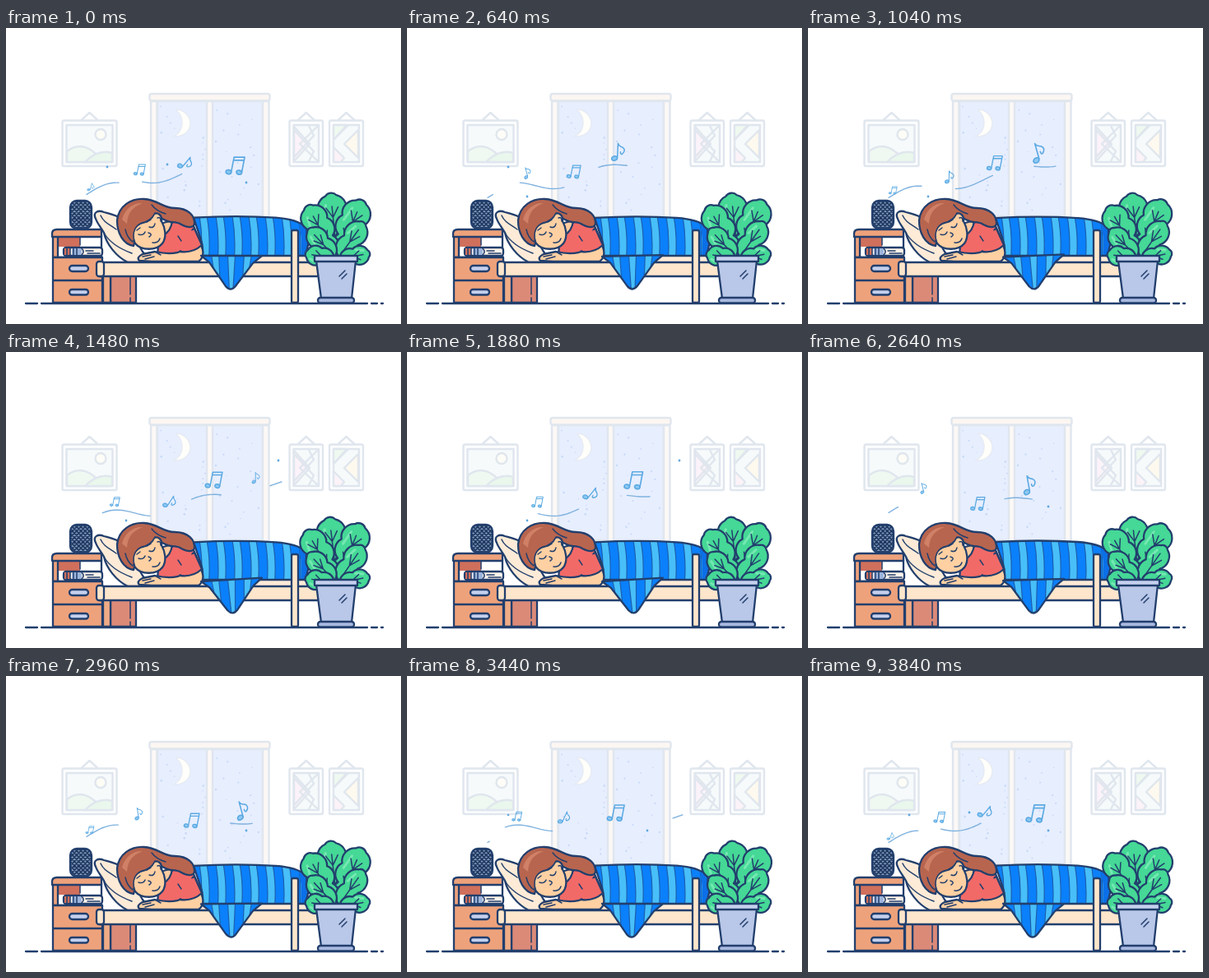
An HTML page for the animation above (3.88 s loop, 480 px wide and 360 px high).

```html
<!DOCTYPE html>
<html lang="en">
<head>
<meta charset="utf-8">
<title>Sleeping to music</title>
<style>
  html, body { margin: 0; width: 100%; height: 100%; overflow: hidden; background: #fff; }
  svg { display: block; width: 480px; height: 360px; }
  .ink { stroke: #223f6d; stroke-width: 2.3; stroke-linecap: round; stroke-linejoin: round; }
  .thin { stroke: #223f6d; stroke-width: 1.5; stroke-linecap: round; fill: none; }
  .pale { stroke: #e0e6ee; stroke-width: 2.4; stroke-linejoin: round; }
  .none { fill: none; }
  .trail { fill: none; stroke: #7fb2df; stroke-width: 1.4; stroke-linecap: round; }
  .note { fill: none; stroke: #5aa9e2; stroke-width: 1.3; stroke-linecap: round; stroke-linejoin: round; }
  .note ellipse { fill: #8cc8f2; }
  .dot { fill: #5fa8e0; }
</style>
</head>
<body>
<svg viewBox="0 0 480 360">
  <defs>
    <clipPath id="coverClip"><path id="coverShape" d="M228 231Q280 228 328 231Q354 233 364 242Q369 250 368 260L364 277H237Q241 270 237 258Z"/></clipPath>
    <clipPath id="flapClip"><path id="flapShape" d="M237 277L247 285L267 314Q273 321 279 314L300 286L311 277Z"/></clipPath>
    <clipPath id="speakerClip"><rect x="78" y="210" width="26" height="34" rx="8"/></clipPath>
  </defs>

  <g class="pale">
    <path fill="#e7eefe" d="M184 89H312V229H184Z"/>
    <g id="snow" stroke="none" fill="#c6d9f8"></g>
    <path fill="#fffefa" stroke="#e6ebf4" stroke-width="1.500" d="M206 99C216 99 224 107 224 116C224 126 215 133 203 132C210 129 214 123 214 115C214 108 211 103 206 99Z"/>
    <path fill="#fbf8f6" d="M176 89H183.500V232H176ZM244 89H251V232H244ZM312 89H319.500V230H312Z"/>
    <rect fill="#fcf6f2" x="174.500" y="80" width="146" height="8.500" rx="2.500"/>
  </g>

  <g id="pictures" class="pale"></g>

  <path class="ink none" d="M24 335H38M43 335H439M444 335H451M456 335H458"/>

  <g class="ink">
    <path fill="#fff" d="M58 253H116V279H58Z"/>
    <path fill="#d0705c" stroke="none" d="M63 254H90V266H63Z"/>
    <path fill="#eea27b" d="M57 253H63V279H57Z"/>
    <path class="thin" d="M90 254V264"/>
    <rect x="70" y="267" width="47" height="10" rx="3" fill="#fdf3ea"/>
    <path fill="#d0705c" stroke="none" d="M71 268H78V276H71Z"/>
    <path fill="#9db5dc" stroke="none" d="M80 268H92V276H80Z"/>
    <path class="thin" d="M74 267V277M78 267V277M82 267V277M86 267V277M92 268Q96 272 92 276M97 271H106M99 274H114"/>
    <path fill="#eea27b" d="M57 279H117V307H57ZM57 307H117V334H57Z"/>
    <rect x="77" y="289" width="23" height="7" rx="3.500" fill="#c4d0ee"/>
    <rect x="77" y="318" width="23" height="6.500" rx="3.200" fill="#c4d0ee"/>
    <path fill="#eea27b" d="M56 254V250Q56 245 62 245H116V254Z"/>
  </g>

  <rect x="78" y="210" width="26" height="34" rx="8" fill="#7e9abd"/>
  <path id="mesh" clip-path="url(#speakerClip)" fill="none" stroke="#223a61" stroke-width="1.800"/>
  <rect class="ink none" x="78" y="210" width="26" height="34" rx="8"/>

  <g class="ink">
    <path fill="#dc8a78" d="M127 300H158V334H127Z"/>
    <path fill="#efab85" d="M118 300H127V334H118Z"/>
    <path class="thin" d="M151 303V324M151 328V334"/>
    <path fill="#fdebd8" d="M182 276H364V287H182Z" stroke="none"/>
    <path fill="#fdebd8" d="M109 232C105 224 112 221 119 224C130 227 140 229 147 239L166 272L176 285H148C134 278 122 263 119 249C116 243 111 238 109 232Z"/>
    <path class="thin" d="M115 228C119 237 126 239 134 245M119 249C124 258 134 267 153 274"/>
  </g>

  <g class="ink">
    <path fill="#f26a67" d="M186 248L207 233C216 232 224 235 228 241L238 266L213 278H184Z"/>
    <path fill="#fdcb9e" d="M184 239L202 234Q201 247 190 253Z"/>
    <path fill="#b8654f" d="M155 265C142 263 135 249 135 234C137 216 152 207 168 208C185 209 190 219 205 219C221 219 230 228 229 239C226 244 219 242 213 239C206 234 200 238 194 234L182 228L160 247Z"/>
    <path fill="#cf8066" stroke="none" d="M141 233C144 219 156 212 166 213C153 218 148 225 147 238Z"/>
    <path class="thin" d="M177 215Q183 223 194 226M145 245Q147 255 154 260"/>
    <path fill="#ffd0a2" d="M157 262C151 252 155 242 163 238C172 236 178 231 180 226C185 224 190 228 189 235C193 242 196 254 190 262C183 271 164 271 157 262Z"/>
    <path fill="#b8654f" stroke="none" d="M156 259C153 249 157 240 165 237C174 235 178 231 181 225L172 218L153 233L149 253Z"/>
    <path class="thin" d="M156 259C153 249 157 240 165 237C174 235 178 231 181 225"/>
    <path class="thin" d="M184 231Q188 229 188 235M161 251Q167 253 169 248M174 242Q180 244 181 238M159 246L163 243M171 236L176 233M173 249Q179 251 174 254M178 261Q185 262 187 256"/>
  </g>

  <g id="cover">
    <g clip-path="url(#coverClip)">
      <path fill="#48bff9" d="M225 225H372V280H225Z"/>
      <path id="coverStripes"/>
      <path fill="#0b70e8" d="M354 232Q361 252 358 278H372V236Z"/>
    </g>
    <use href="#coverShape" class="ink none"/>
  </g>

  <g class="ink">
    <path fill="#ffd0a2" d="M223 258L237 264Q243 277 234 284H177L162 283Q158 279 166 275L181 272Q204 277 216 270Z"/>
    <path fill="#f26a67" d="M210 252L229 244L238 264Q227 274 212 272Z"/>
    <path fill="#f26a67" stroke="none" d="M209 250L226 243L223 258L214 270L205 271Z"/>
    <path class="thin" d="M166 278L176 276M169 281L180 278M181 272L188 276M209 253L213 259"/>
    <rect x="112" y="285" width="268" height="17" rx="2" fill="#fde6cb"/>
    <rect x="110" y="284" width="9" height="18" rx="3" fill="#fde6cb"/>
  </g>

  <g id="flap">
    <g clip-path="url(#flapClip)">
      <path fill="#48bff9" d="M230 275H320V322H230Z"/>
      <path id="flapStripes"/>
    </g>
    <use href="#flapShape" class="ink none"/>
  </g>
  <rect class="ink" x="347" y="246" width="8" height="88" rx="2" fill="#fde6cb"/>

  <g id="plant" class="ink"></g>
  <g class="ink">
    <path fill="#b9c7e8" d="M377 283H425L420 329H383Z"/>
    <path fill="#c5d1ee" d="M375 277H427V284H375Z"/>
    <rect x="379" y="328" width="44" height="6.500" rx="3" fill="#aab9df"/>
    <path class="thin" d="M405 302L412 295M408 305L414 299"/>
  </g>

  <g id="music"></g>
</svg>

<script>
const LOOP = 3880;
const { sin, cos, min, max, hypot, PI } = Math;
const $ = id => document.getElementById(id);
const range = (n, f) => Array.from({ length: n }, (_, i) => f(i));
const clamp = v => max(0, min(1, v));
const mod = (a, b) => ((a % b) + b) % b;

function add(parent, tag, attrs, html = '') {
  const node = document.createElementNS('http://www.w3.org/2000/svg', tag);
  for (const k in attrs) node.setAttribute(k, attrs[k]);
  node.innerHTML = html;
  parent.appendChild(node);
  return node;
}

// ---------- still scenery ----------
let seed = 11;
const rnd = () => (seed = (seed * 16807) % 2147483647) / 2147483647;
range(40, i => add($('snow'), 'circle', {
  cx: (i % 2 ? 254 : 188) + rnd() * 54, cy: 94 + (i + rnd()) * 3.2, r: 0.7 + rnd() * 0.6
}));

function frame(x, w, art) {
  const c = x + w / 2;
  add($('pictures'), 'g', {}, `
    <path fill="none" d="M${c - 10} 112L${c} 103L${c + 10} 112"/>
    <rect x="${x}" y="112.5" width="${w}" height="55.5" rx="2" fill="#fcfdfe"/>
    <rect x="${x + 5}" y="118" width="${w - 10}" height="45" fill="#f6fafb"/>${art}`);
}
frame(68.5, 66, `<circle cx="115" cy="129.5" r="6.5" fill="#fdfcf6"/>
  <path fill="#f0f9f1" d="M74 150Q91 137 108 152L124 163H74Z"/>
  <path fill="#e9f7ec" d="M96 163Q112 147 129 152V163Z"/>`);
frame(344.5, 40.5, `<path fill="#fbf3f9" d="M350 120L369 141L350 162Z"/>
  <path fill="none" d="M379 119L357 141L379 162M350 124L374 150L368 162M350 157L374 131L368 119"/>`);
frame(393, 41, `<path fill="#f0f9f0" d="M398 118H414L398 136Z"/><path fill="#fbf3f8" d="M398 145L411 158L407 163H398Z"/>
  <path fill="#fdf9ee" d="M428 124L411 141L428 158Z"/><path fill="none" d="M398 136L416 118"/>`);

$('mesh').setAttribute('d', range(16, i =>
  `M${50 + i * 5.2} 208l38 38M${132 - i * 5.2} 208l-38 38`).join(''));

function stripes(id, d) {
  const edge = $(id), line = { d, fill: 'none' };
  const group = add(edge.parentNode, 'g', {});
  add(group, 'path', { ...line, stroke: '#1b5fae', 'stroke-width': 12 });
  add(group, 'path', { ...line, stroke: '#0b80fb', 'stroke-width': 9.6 });
  edge.replaceWith(group);
}
stripes('coverStripes', range(8, i => `M${229 + i * 20} 226q5 25 3 54`).join(''));
stripes('flapStripes', range(4, i => {
  const x = 244 + i * 20;
  return `M${x} 275L${273 + (x - 273) * 0.75} 322`;
}).join(''));

// Scalloped leaf from base to tip.
function leaf(bx, by, tx, ty, w, n) {
  const dx = tx - bx, dy = ty - by, len = hypot(dx, dy);
  const at = (u, s) => {
    const k = s * w * sin(PI * (0.05 + 0.8 * u ** 1.3)) / len;
    return [bx + dx * u - dy * k, by + dy * u + dx * k];
  };
  const lobes = pts => pts.slice(1).map((p, i) => {
    const r = hypot(p[0] - pts[i][0], p[1] - pts[i][1]) * 0.64;
    return `A${r} ${r} 0 0 1 ${p}`;
  }).join('');
  const out = range(n + 1, i => at(i / n, -1));
  const back = range(n + 1, i => at(1 - i / n, 1));
  const ribs = range(n - 1, i => {
    const u = (i + 0.9) / n, e = u + 0.5 / n;
    return `M${at(e, 0.55)}L${at(u, 0)}L${at(e, -0.55)}`;
  }).join('');
  add($('plant'), 'g', {}, `
    <path fill="#45d896" d="M${out[0]}${lobes([...out, ...back])}Z"/>
    <path fill="none" stroke="#74e8b2" stroke-width="3" d="M${at(0.6, -0.75)}L${at(0.85, -0.6)}"/>
    <path class="thin" d="M${at(0, 0)}L${at(0.82, 0)}${ribs}"/>`);
}
leaf(402, 276, 394, 204, 15, 3);
leaf(404, 276, 431, 212, 15, 3);
leaf(399, 276, 367, 219, 14, 3);
leaf(405, 278, 433, 238, 11, 2);
leaf(399, 278, 369, 246, 10, 2);
leaf(406, 281, 440, 274, 10, 2);
leaf(398, 281, 366, 275, 11, 2);

// ---------- motion ----------
const single = `<ellipse cx="-3" cy="7" rx="3" ry="2.3" transform="rotate(-20 -3 7)"/>
  <path d="M0 6V-9Q1 -6 5 -5Q9 -2 5 2Q3 3 3 0"/>`;
const pair = `<ellipse cx="-6" cy="8" rx="2.6" ry="2"/><ellipse cx="4" cy="6.5" rx="2.6" ry="2"/>
  <path d="M-3.500 8V-7L6.500 -9V6.500M-3.500 -4L6.500 -6"/>`;

// Rising ripple that carries the music from the speaker to the pictures.
const ripple = x => 188 - 0.15 * (x - 103)
  + 9 * (1 - (x - 100) / 400) * sin(2 * PI * (x - 168) / 115);

const parts = [];

function voice(shape, born, lift, hasTrail) {
  const line = add($('music'), 'path', { class: 'trail' });
  const node = add($('music'), 'g', { class: 'note' }, shape);
  parts.push(t => {
    // Seconds since the note left the speaker; the trail sets out earlier.
    const age = mod(t - born + 500, LOOP) / 1000 - 0.5;
    const a = min(age, 3.38);

    const x = 103 + 61 * a + 6 * sin(PI * a / 3.4);
    const turn = shape === pair ? 11 : 12 + 28 * cos(2 * PI * (a - 1.75) / 2.25);
    const size = max(0, min(0.55 + 0.25 * a, (3.75 - age) * 1.5, (age + 0.2) * 4));
    node.setAttribute('transform', `translate(${x} ${ripple(x) + lift}) rotate(${turn}) scale(${size})`);
    node.setAttribute('opacity', clamp(size * 2));

    const from = max(98, 70 + 105 * age), to = min(335, 137 + 84 * age);
    const shown = hasTrail && to > from;
    line.setAttribute('d', shown ? 'M' + range(13, i => {
      const px = from + (to - from) * i / 12;
      return `${px} ${ripple(px + 10) + 12 + lift}`;
    }).join('L') : '');
  });
}
voice(single, 0, 2, true);
voice(pair, 1030, 6, true);
voice(single, 2090, -9, false);
voice(pair, 2970, -5, true);

function dot(x, y, from, span) {
  const node = add($('music'), 'circle', { class: 'dot', cx: x, cy: y });
  parts.push(t => {
    const age = mod(t - from, LOOP);
    node.setAttribute('r', 1.4 * min(clamp(age / 150), clamp((span - age) / 150)));
  });
}
dot(123, 169, 3300, 1400);
dot(146, 205, 400, 2150);
dot(196, 166, 3640, 460);
dot(292, 188, 2080, 2120);
dot(331, 132, 1280, 1220);

function draw() {
  const t = performance.now() % LOOP;
  const sway = cos(2 * PI * (t - 1700) / LOOP);
  $('cover').setAttribute('transform', `translate(0 277) scale(1 ${1 - 0.008 * sway}) translate(0 -277)`);
  $('flap').setAttribute('transform', `rotate(${-1.6 - 2 * sway} 273 277)`);
  $('plant').setAttribute('transform', `rotate(${-0.6 * sway} 402 282)`);
  parts.forEach(p => p(t));
  requestAnimationFrame(draw);
}
draw();
</script>
</body>
</html>
```
